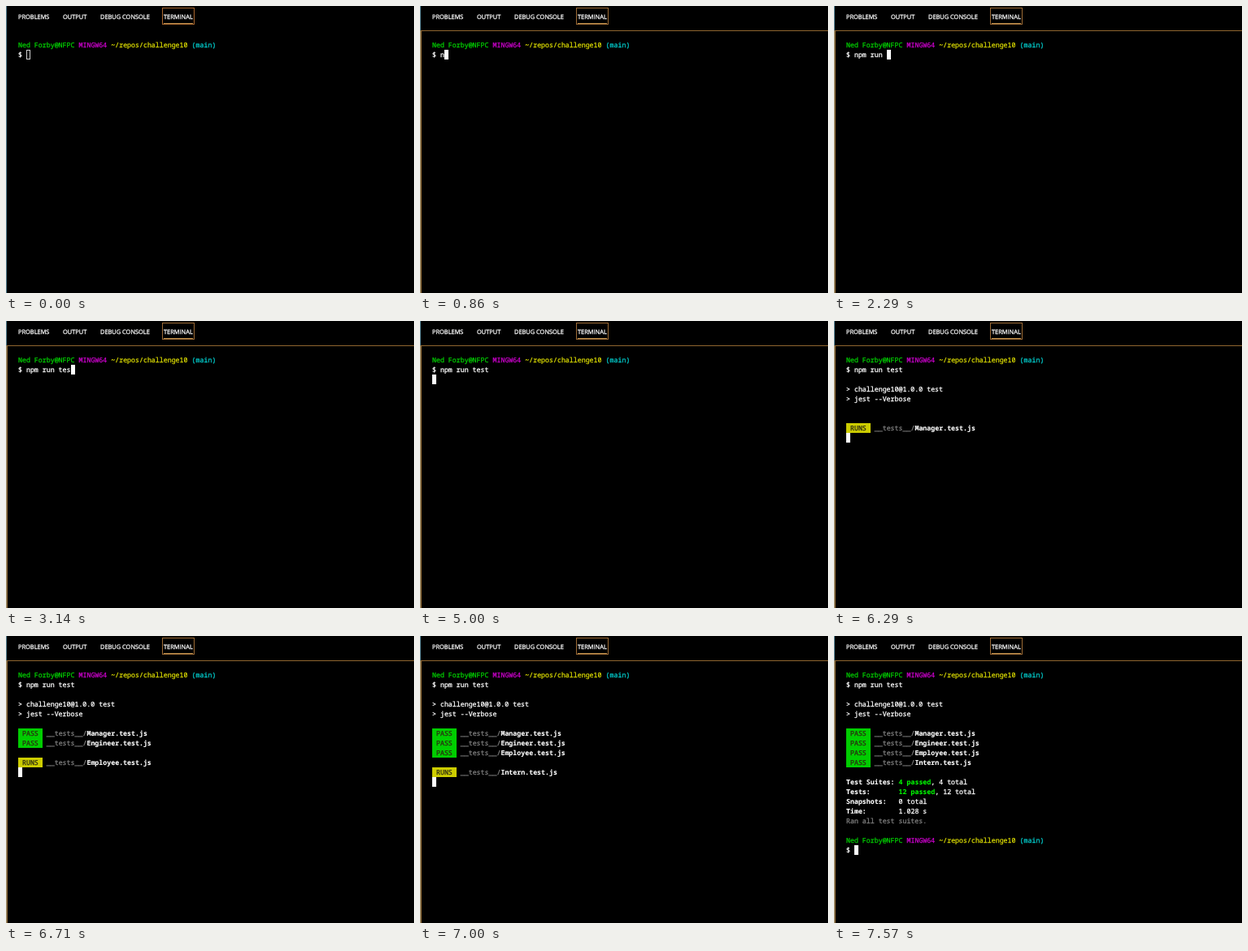
Write an HTML page that moves like this. It is 502x354 px and loops after 8 s.

```html
<!DOCTYPE html>
<html lang="en">
<head>
<meta charset="utf-8">
<title>Terminal test run</title>
<style>
  html, body { margin: 0; width: 100%; height: 100%; overflow: hidden; background: #000; }
  svg { display: block; width: 100vw; height: 100vh; }
  text {
    white-space: pre; text-rendering: geometricPrecision;
    color: #fff; fill: currentColor; stroke: currentColor; stroke-width: .28;
  }
  #tabs text { font: 7.43px "Open Sans", "Noto Sans", sans-serif; }
  #screen text { font: 8.28px "Noto Sans Mono", "DejaVu Sans Mono", monospace; }
  #screen .bold { font-weight: 700; stroke-width: .1; }
  .green { color: #00cd00; }
  .magenta { color: #cd00cd; }
  .yellow { color: #d7d700; }
  .cyan { color: #00cdcd; }
  #screen .lime { color: #00f400; }
  .dim { color: #7f7f7f; }
  .label { color: #2b2b12; }
</style>
</head>
<body>
<svg viewBox="0 0 502 354" xmlns="http://www.w3.org/2000/svg">
  <rect width="502" height="354" fill="#000"/>
  <g id="tabs">
    <text x="15" y="15.5">PROBLEMS</text>
    <text x="70" y="15.5">OUTPUT</text>
    <text x="116" y="15.5">DEBUG CONSOLE</text>
    <text x="194" y="15.5">TERMINAL</text>
    <rect id="tabBox" x="192.5" y="2.5" width="39" height="20" fill="none"/>
    <path d="M194 21.5H230" stroke="#b98d4c"/>
  </g>
  <path d="M.5 0V354" stroke="#55808f"/>
  <g id="focused" fill="none">
    <path d="M.5 30V354" stroke="#94886a"/>
    <path d="M1.5 30V354" stroke="#8a6430"/>
    <path d="M1 30.5H502" stroke="#8f6630"/>
  </g>
  <g id="screen"></g>
</svg>
<script>
const LOOP = 8000, LEFT = 15, TOP = 42, COL = 4.968, ROW = 12;
const $ = id => document.getElementById(id);

const FOCUS = 140, ENTER = 4000, BANNER = 5140, RUN = 6000, SUMMARY = 7140, PROMPT = 7570;
const COMMAND = 'npm run test';
const KEYS = [860, 1000, 1140, 1290, 1430, 1500, 1570, 2290, 2710, 3000, 3140, 3290];
const SUITES = ['Manager', 'Engineer', 'Employee', 'Intern'];
const PASSED = [6570, 6710, 6860, SUMMARY];

const countBy = (times, t) => times.filter(at => t >= at).length;

// A line is a list of [text, classes] runs.
const prompt = [
  ['Ned Forby@NFPC ', 'green'], ['MINGW64 ', 'magenta'],
  ['~/repos/challenge10 ', 'yellow'], ['(main)', 'cyan']
];
const suite = (status, name) => [
  [` ${status} `, 'label'], [' __tests__/', 'dim'], [`${name}.test.js`, 'bold']
];
const summary = [
  [],
  [['Test Suites: ', 'bold'], ['4 passed', 'bold lime'], [', 4 total']],
  [['Tests:       ', 'bold'], ['12 passed', 'bold lime'], [', 12 total']],
  [['Snapshots:   ', 'bold'], ['0 total']],
  [['Time:        ', 'bold'], ['1.028 s']],
  [['Ran all test suites.', 'dim']]
];

function linesAt(t) {
  const lines = [prompt, [['$ ' + COMMAND.slice(0, countBy(KEYS, t))]]];
  if (t < ENTER) return lines;
  if (t >= BANNER) {
    lines.push([], [['> challenge10@1.0.0 test']], [['> jest --Verbose']], []);
  }
  if (t >= RUN) {
    const done = countBy(PASSED, t);
    SUITES.slice(0, done).forEach(name => lines.push(suite('PASS', name)));
    if (done < SUITES.length) lines.push([], suite('RUNS', SUITES[done]));
  }
  if (t >= SUMMARY) lines.push(...summary);
  if (t >= PROMPT) lines.push([], prompt, [['$ ']]);
  else lines.push([]);
  return lines;
}

// Cell backgrounds snap to whole pixels.
function box(col, row, cols, fill) {
  const x = Math.round(LEFT + col * COL);
  return `<rect x="${x}" y="${TOP + row * ROW}" width="${Math.round(cols * COL)}" height="${ROW}" fill="${fill}"/>`;
}

function drawLine(runs, row) {
  let col = 0, out = '';
  for (const [text, cls = ''] of runs) {
    if (cls === 'label') out += box(col, row, text.length, text === ' PASS ' ? '#00cd00' : '#cdcd00');
    out += `<text x="${LEFT + col * COL}" y="${TOP + row * ROW + 8.8}" class="${cls}">${text.replace('>', '&gt;')}</text>`;
    col += text.length;
  }
  return out;
}

function drawCursor(lines, solid) {
  const row = lines.length - 1;
  const col = lines[row].reduce((n, [text]) => n + text.length, 0);
  if (solid) return box(col, row, 1, '#fff');
  return `<rect x="${Math.round(LEFT + col * COL) + .5}" y="${TOP + row * ROW + .5}" width="4" height="11" fill="none" stroke="#d0d0d0"/>`;
}

let shown = '';
function render(t) {
  const focused = t >= FOCUS;
  const lines = linesAt(t);
  const html = lines.map(drawLine).join('') + drawCursor(lines, focused);
  if (html === shown) return;
  shown = html;
  $('screen').innerHTML = html;
  $('focused').style.display = focused ? '' : 'none';
  $('tabBox').setAttribute('stroke', focused ? '#9c6a35' : '#a8662e');
}

const start = performance.now();
function tick() {
  render((performance.now() - start) % LOOP);
  requestAnimationFrame(tick);
}
tick();
</script>
</body>
</html>
```
